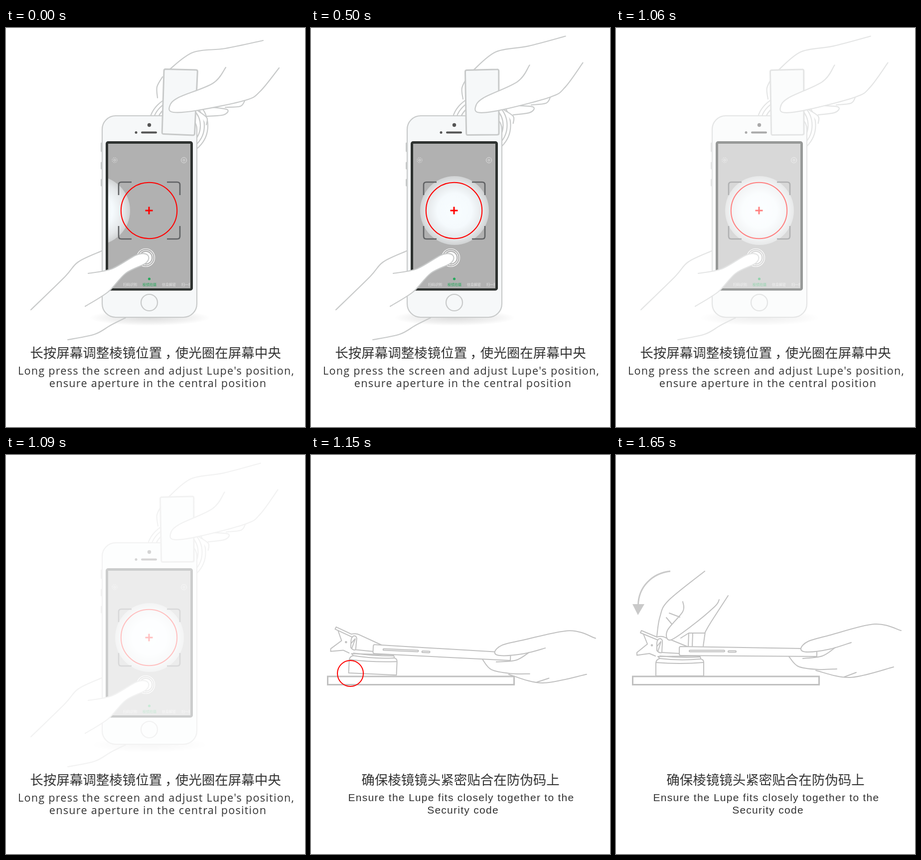
Write an HTML page that moves like this. It is 600x800 px and loops after 2120 ms.

```html
<!DOCTYPE html>
<html lang="zh-CN">
<head>
<meta charset="utf-8">
<style>
  html, body { margin: 0; width: 100%; height: 100%; overflow: hidden; background: #fff; }
  svg { display: block; }
  path, .line { fill: none; stroke: #c8caca; stroke-width: 2.2; stroke-linecap: round; stroke-linejoin: round; }
  .white { fill: #fff; }
  .shell { fill: #f6f8f9; }
  .thick { stroke-width: 3; }
  .mark { stroke: #606264; stroke-width: 2.6; stroke-linecap: butt; }
  .red { fill: none; stroke: #f00; stroke-width: 2; stroke-linecap: butt; }
  .light { fill: none; stroke: #fff; stroke-width: 1.2; }
  .icons { stroke: #e0e0e0; stroke-width: 1; }
  #side path, #side .line { stroke: #c0c0c0; stroke-width: 2; }
  #side .thick { stroke-width: 3; }
  text { fill: #333; text-anchor: middle; }
  .zh { font: 300 26.5px "Noto Sans CJK SC", "Noto Sans CJK", sans-serif; }
  .humanist { font: 21.5px "Open Sans", "Noto Sans", sans-serif; letter-spacing: 1.3px; }
  .grotesque { font: 21px "Liberation Sans", Arial, sans-serif; letter-spacing: 1.27px; }
  #tabs text { font: 7px "Noto Sans CJK SC", "Noto Sans CJK", sans-serif; fill: #e8e8e8; text-anchor: start; }
  #tabs .active { fill: #25a95b; }
</style>
</head>
<body>
<svg width="600" height="800" viewBox="0 0 600 800">
  <defs>
    <radialGradient id="glow">
      <stop offset="0" stop-color="#f8fdff"/>
      <stop offset=".5" stop-color="#f5fafd"/>
      <stop offset=".82" stop-color="#e4e7e9"/>
      <stop offset="1" stop-color="#d0d2d3"/>
    </radialGradient>
    <radialGradient id="shade">
      <stop offset="0" stop-opacity=".14"/>
      <stop offset=".7" stop-opacity=".05"/>
      <stop offset="1" stop-opacity="0"/>
    </radialGradient>
    <path id="corner" class="mark" d="M-61.500-31V-51.500q0-5.500 5.500-5.500H-35.500"/>
  </defs>

  <g id="front">
    <ellipse cx="288" cy="581" rx="122" ry="16" fill="url(#shade)"/>
    <path data-through="124,625 178,614 210,596 240,581"/>

    <g id="lens">
      <circle class="line white" cx="346" cy="196" r="59"/>
      <circle class="line" cx="346" cy="196" r="52"/>
      <circle class="line" cx="346" cy="196" r="44"/>
    </g>
    <g class="gripping">
      <path class="white" data-through="385,166 403,180 402,194"/>
      <path class="white" data-through="400,158 443,163 437,174 403,177"/>
      <path class="white" data-through="440,159 470,157 479,146"/>
      <path data-through="314,98 303,118 304,140"/>
      <path data-through="516,25 440,41 375,49 327,84"/>
    </g>

    <!-- phone -->
    <path class="thick" d="M191.500 231v16m0 23v12m0 22v12"/>
    <rect class="line shell" x="193" y="176" width="190" height="404" rx="27"/>
    <g fill="#555">
      <circle cx="287.500" cy="194.500" r="3.700"/>
      <circle cx="261" cy="209.500" r="2.500"/>
      <rect x="271" y="207.500" width="32" height="4" rx="2"/>
    </g>
    <circle class="line" cx="287.500" cy="550.500" r="16.500"/>
    <rect x="200" y="227" width="175" height="299.500" rx="5" fill="#2e3230"/>
    <svg x="205" y="232" width="165" height="290" viewBox="205 232 165 290">
      <rect x="205" y="232" width="165" height="290" fill="#b1b1b1"/>
      <circle id="spot" cy="366" r="69" fill="url(#glow)"/>
      <g class="light icons">
        <circle cx="218" cy="265" r="5" stroke-dasharray="2.400 1.500"/>
        <circle cx="218" cy="265" r="2"/>
        <circle cx="357" cy="265" r="5.500"/>
        <circle cx="357" cy="265" r="2"/>
      </g>
      <circle cx="287.500" cy="503" r="2.600" fill="#25a95b"/>
      <g id="tabs"></g>
    </svg>
    <g transform="translate(287.500 366)">
      <use href="#corner"/>
      <use href="#corner" transform="scale(-1 1)"/>
      <use href="#corner" transform="scale(1 -1)"/>
      <use href="#corner" transform="scale(-1 -1)"/>
    </g>
    <circle class="red" cx="287" cy="366" r="56.200"/>
    <path class="red" style="stroke-width:3" d="M279.500 366h15m-7.500-7.500v15"/>

    <!-- pressing hand -->
    <g class="light">
      <circle cx="280.500" cy="460.500" r="18"/>
      <circle cx="280.500" cy="460.500" r="14.500"/>
      <circle cx="280.500" cy="460.500" r="11" fill="#fff"/>
    </g>
    <path data-through="50,565 118,499 145,469 192,447"/>
    <path class="white" data-through="165,492 212,483 262,455 284,455 281,471 240,492 205,529 159,558"/>

    <path id="card" class="shell thick" d="M320 82.500L381 84q3.500 0 3.300 3.500L378.500 212q-.2 3-3.500 3L316 212.500q-3 0-2.800-3.500L317 86q0-3.500 3-3.500z"/>
    <g class="gripping">
      <path class="white" data-through="441,79 415,111 345,140 328,158 336,169 385,165 480,145 510,127 548,80"/>
    </g>
  </g>

  <g id="frontText">
    <text class="zh" x="300" y="661">长按屏幕调整棱镜位置<tspan dx="6">，</tspan><tspan dx="-6">使光圈在屏幕中央</tspan></text>
    <text class="humanist" x="301.500" y="694.500">Long press the screen and adjust Lupe's position,</text>
    <text class="humanist" x="305" y="719.500">ensure aperture in the central position</text>
  </g>

  <g id="side">
    <g id="device">
      <!-- clip -->
      <path d="M55 359l8 20-21 17v5.500l25-3.500 12 5"/>
      <path d="M49 356.500L51 352l31 13q10-3 17 1l44 18M49 356.500L84 371"/>
      <circle class="line" cx="72" cy="381.500" r="1.300"/>
      <path d="M82 377q1-9 7-9 5 2 4 8l-1 20q-5 2-10-4zM82 384l8-10M84 394l6-19M93 396l35 2"/>
      <!-- lens -->
      <path class="white" d="M80 443V418q0-8 8-10l-4-4 82-1q4 0 4 6 6 1 6 7v27z"/>
      <path d="M88 403q40 4 80 2M88 408q40 5 82 1M80 416q48 4 95 0"/>
      <!-- phone edge -->
      <path class="white" d="M130 384l273 4.500V404L130 402q-3 0-3-3V387q0-3 3-3z"/>
      <rect class="line" x="147" y="391.500" width="71" height="3" rx="1.500"/>
      <rect class="line" x="225" y="392.500" width="16" height="3" rx="1.500"/>
      <!-- holding hand -->
      <path class="white" data-through="572,352 519,339 430,361 385,374 371,389 385,395 430,389 472,376"/>
      <path data-through="347,404 366,424 405,430 443,429"/>
      <path data-through="375,408 414,403 440,386"/>
      <path data-through="401,432 470,446 557,425"/>
      <path data-through="458,445 482,436"/>
    </g>

    <g id="press">
      <path data-through="178,233 105,292 88,325 82,363"/>
      <path data-through="225,282 190,336 179,355"/>
      <path d="M179 355l-4 28M130 367l16-10h32M154 357l-1 26M146 357l-1 26"/>
      <path class="white" data-through="134,294 134,314 103,352 109,371 150,344 198,304 207,290"/>
      <path data-through="107,317 128,325"/>
      <path data-through="101,326 112,339"/>
      <path class="thick" style="stroke:#c9c9c9;stroke-linecap:butt" d="M109 233C72 237 45 265 44.500 301"/>
      <path d="M33 299h24L44 321z" style="fill:#c9c9c9;stroke:none"/>
    </g>

    <rect class="line white thick" style="stroke-linejoin:miter" x="33.500" y="444" width="374" height="16.500"/>
    <circle id="gap" class="red" cx="79" cy="438" r="26"/>
    <text class="zh" x="300" y="661">确保棱镜镜头紧密贴合在防伪码上</text>
    <text class="grotesque" x="301.500" y="694">Ensure the Lupe fits closely together to the</text>
    <text class="grotesque" x="305" y="719">Security code</text>
  </g>
</svg>
<script>
  const LOOP = 2120, CENTERED = 500, FADE = 1030, FADE_STEP = 30, SIDE = 1150, PRESSED = 1650;
  const $ = id => document.getElementById(id);
  const show = (id, visible) => { $(id).style.display = visible ? '' : 'none'; };
  const place = (el, transform) => el.setAttribute('transform', transform);

  // Smooth curve through a few points (Catmull-Rom as cubic Béziers).
  function curve(points) {
    const at = i => points[Math.max(0, Math.min(points.length - 1, i))];
    const handle = (i, sign) => at(i).map((v, axis) => v + sign * (at(i + 1)[axis] - at(i - 1)[axis]) / 6);
    return 'M' + points[0] + points.slice(1).map((end, i) => `C${handle(i, 1)} ${handle(i + 1, -1)} ${end}`).join('');
  }
  for (const path of document.querySelectorAll('[data-through]')) {
    const points = path.dataset.through.split(' ').map(pair => pair.split(',').map(Number));
    path.setAttribute('d', curve(points));
  }

  $('tabs').innerHTML = ['扫码识别', '棱镜拍摄', '信息解密', '扫一扫'].map((label, i) =>
    `<text x="${235 + 39 * i}" y="517" class="${i === 1 ? 'active' : ''}">${label}</text>`).join('');

  const gripping = document.querySelectorAll('.gripping');

  function draw() {
    const t = performance.now() % LOOP;
    const centered = t >= CENTERED, side = t >= SIDE, pressed = t >= PRESSED;

    show('front', !side);
    show('frontText', !side);
    show('side', side);

    $('spot').setAttribute('cx', centered ? 288 : 180);
    place($('lens'), centered ? 'translate(-4.5 -1)' : '');
    place($('card'), centered ? 'translate(-4.5 .5) rotate(-2.8 348 149)' : '');
    gripping.forEach(el => place(el, centered ? 'translate(2 1) rotate(-3 330 160)' : ''));
    const faded = t < FADE ? 0 : Math.floor((t - FADE) / FADE_STEP) + 1;
    $('front').setAttribute('opacity', Math.max(0, 1 - faded / 4));

    place($('device'), pressed ? '' : 'translate(-3 -6) rotate(2.5 80 410)');
    show('press', pressed);
    show('gap', !pressed);
    requestAnimationFrame(draw);
  }
  draw();
</script>
</body>
</html>
```
